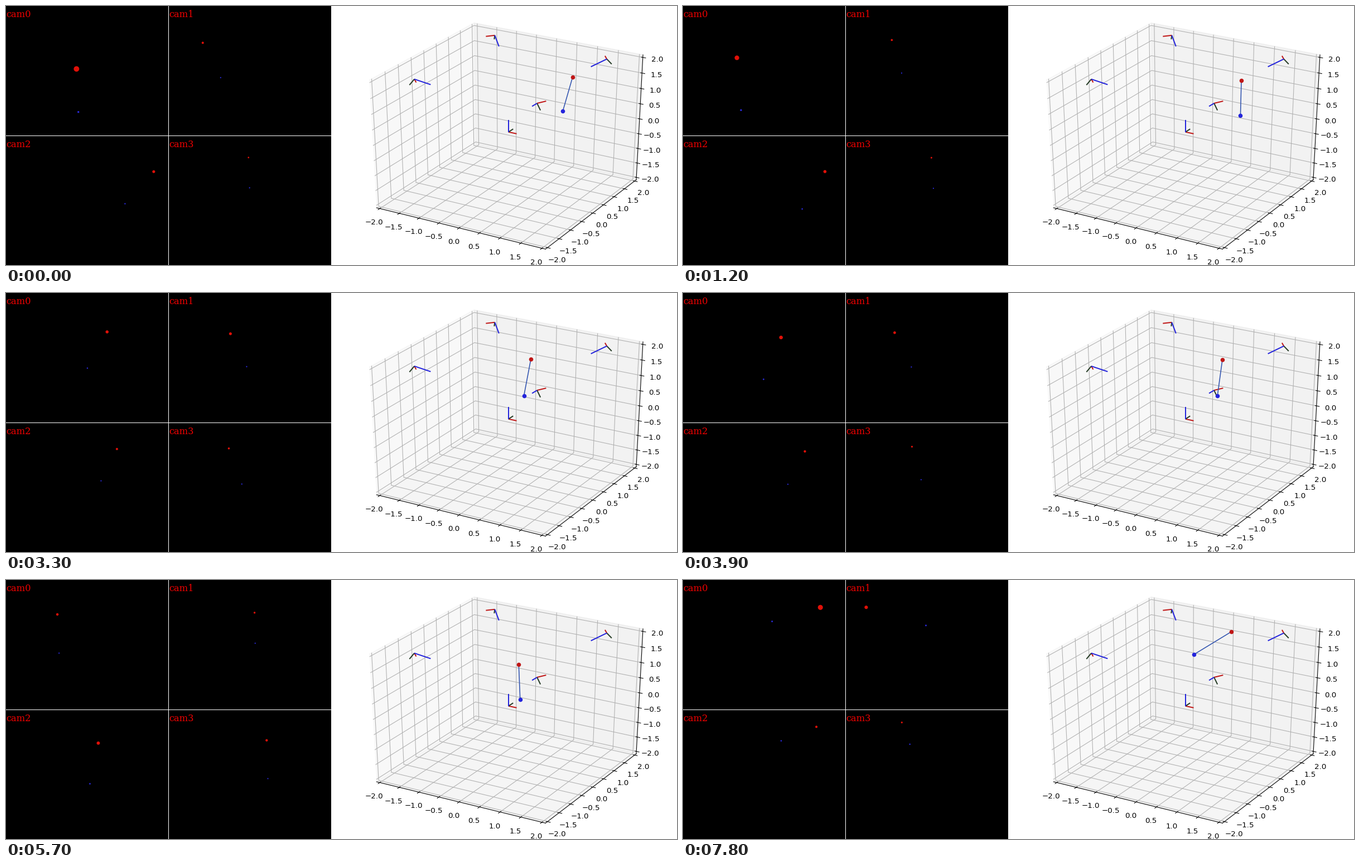
Recreate the animation shown at these times as a matplotlib script. Size 1203 by 466 pixels, loop 8000 ms.

```python
import numpy as np
import matplotlib.pyplot as plt
from matplotlib.animation import FuncAnimation
from matplotlib.patches import Circle, Rectangle
from mpl_toolkits.mplot3d import Axes3D

W, H, DPI = 1203, 466, 96
PX = 72 / DPI                       # points per pixel
VIEW_W, VIEW_H = 291.5, 233.5       # one camera view
STEP, TICKS_PER_STEP, FRAMES = 100, 3, 80

RED, BLUE, GREEN = "#c01616", "#2424dc", "#263c26"
ROD_LENGTH = 1.065

# Wand poses: step, tip x y z, horizontal offset of the tail
POSES = np.array([
    (0, 1.025, 0.927, 1.62, -0.125, -0.169),
    (4, 0.990, 0.626, 1.64, 0.049, -0.097),
    (7, -0.714, -0.109, 1.695, 0.020, -0.172),
    (11, 0.103, 0.773, 1.61, 0.057, -0.393),
    (15, 0.566, 0.745, 1.627, 0.049, -0.157),
    (19, 0.396, -0.262, 1.582, 0.097, -0.103),
    (26, 0.373, 1.307, 1.897, -0.414, -0.877),
])
KEYS, POSES = POSES[:, 0], POSES[:, 1:]
SLOPES = np.gradient(POSES, KEYS, axis=0)

plt.rcParams.update({"font.family": "DejaVu Sans", "font.size": 10})


class WideAxes3D(Axes3D):
    """3D axes that fill their rectangle instead of staying square."""

    def apply_aspect(self, position=None):
        pass


fig = plt.figure(figsize=(W / DPI, H / DPI), dpi=DPI, facecolor="white")

room = WideAxes3D(fig, [582 / W, 0, 621 / W, 1], elev=30, azim=-60)
fig.add_axes(room)
room.set_box_aspect((1, 1, 1), zoom=3 ** 0.5 / 1.8294640721620434)
limit = 2 + 1 / 12
room.set(xlim=(-limit, limit), ylim=(-limit, limit), zlim=(-limit, limit))
for axis in (room.xaxis, room.yaxis, room.zaxis):
    axis.set_ticks(np.arange(-2, 2.1, 0.5))

# Pixel canvas for the camera views
canvas = fig.add_axes([0, 0, 1, 1])
canvas.set(xlim=(0, W), ylim=(H, 0))
canvas.axis("off")


def box(x, y, w, h, color):
    canvas.add_patch(Rectangle((x, y), w, h, fc=color, lw=0, zorder=1))


def room_line(points, color, width, **style):
    return room.plot(*np.transpose(points), color=color, lw=width * PX, **style)[0]


def triad(origin, axes):
    """Short x and y axes, long z axis."""
    for direction, size, color in zip(axes, (0.2, 0.2, 0.4), (RED, GREEN, BLUE)):
        room_line([origin, origin + size * direction], color, 2,
                  solid_capstyle="butt", zorder=3)


class Camera:
    """Pinhole camera with its own view and a dot for each wand end."""

    def __init__(self, index, position, yaw, pitch, roll, focal):
        self.position, self.focal = np.array(position), focal
        y, p = np.radians([yaw, pitch])
        ahead = np.array([np.cos(p) * np.cos(y), np.cos(p) * np.sin(y), -np.sin(p)])
        side = np.array([np.sin(y), -np.cos(y), 0])
        down = np.cross(ahead, side)
        c, s = np.cos(roll), np.sin(roll)
        self.axes = np.array([c * side - s * down, c * down + s * side, ahead])
        triad(self.position, self.axes)

        corner = np.array([VIEW_W * (index % 2), VIEW_H * (index // 2)])
        self.center = corner + (145.5, 116.5)
        canvas.text(corner[0] + 0.5, corner[1] + 20.5, f"cam{index}",
                    family="DejaVu Serif", size=16.3 * PX, color="#f00000", zorder=5)
        frame = Rectangle(corner, VIEW_W, VIEW_H, transform=canvas.transData)
        self.dots = [self.add_dot("#e01008", frame), self.add_dot("#2a2ad8", frame)]

    def add_dot(self, color, frame):
        dot = canvas.add_patch(Circle((0, 0), 1, fc=color, lw=0, zorder=4))
        dot.set_clip_path(frame)
        return dot

    def look(self, ends):
        for dot, end, glow in zip(self.dots, ends, (4.3, 2.8)):
            *flat, depth = self.axes @ (end - self.position)
            dot.center = self.center + self.focal * np.array(flat) / depth
            dot.radius = max(glow / depth, 1.1)


box(0, 0, 2 * VIEW_W - 0.5, H, "black")
box(VIEW_W - 0.2, 0, 1, H, "white")
box(0, VIEW_H - 0.2, 2 * VIEW_W - 0.5, 1, "white")

triad(np.zeros(3), np.eye(3))
cameras = [
    Camera(0, (1.54, 1.47, 2.08), 218.5, 33, 0, 160),
    Camera(1, (-1.35, 1.74, 2.0), -44.8, 28.6, -0.06, 160),
    Camera(2, (1.46, -1.39, 2.0), 138, 39.5, 0.15, 130),
    Camera(3, (-1.40, -1.45, 2.0), 43.7, 32.2, 0, 160),
]

rod = room_line(np.zeros((2, 3)), "#3355b0", 1.6, zorder=4)
markers = [room_line(np.zeros((1, 3)), color, 0, marker="o", ms=7.6 * PX,
                     mew=0, zorder=5) for color in (RED, BLUE)]


def pose(k):
    """Smooth cubic path through the key poses; returns tip and tail."""
    i = min(np.searchsorted(KEYS, k, side="right") - 1, len(KEYS) - 2)
    h = KEYS[i + 1] - KEYS[i]
    s = (k - KEYS[i]) / h
    blend = s * s * (3 - 2 * s)
    x, y, z, dx, dy = ((1 - blend) * POSES[i] + blend * POSES[i + 1]
                       + h * s * (1 - s) * ((1 - s) * SLOPES[i] - s * SLOPES[i + 1]))
    dz = np.sqrt(max(ROD_LENGTH ** 2 - dx * dx - dy * dy, 0))
    return np.array([(x, y, z), (x + dx, y + dy, z - dz)])


def update(frame):
    ends = pose(frame // TICKS_PER_STEP)
    rod.set_data_3d(*ends.T)
    for marker, end in zip(markers, ends):
        marker.set_data_3d(*end[:, None])
    for camera in cameras:
        camera.look(ends)
    return []


anim = FuncAnimation(fig, update, frames=FRAMES, interval=STEP,
                     init_func=lambda: update(0), repeat=True,
                     repeat_delay=0, blit=False)
plt.show()
```
